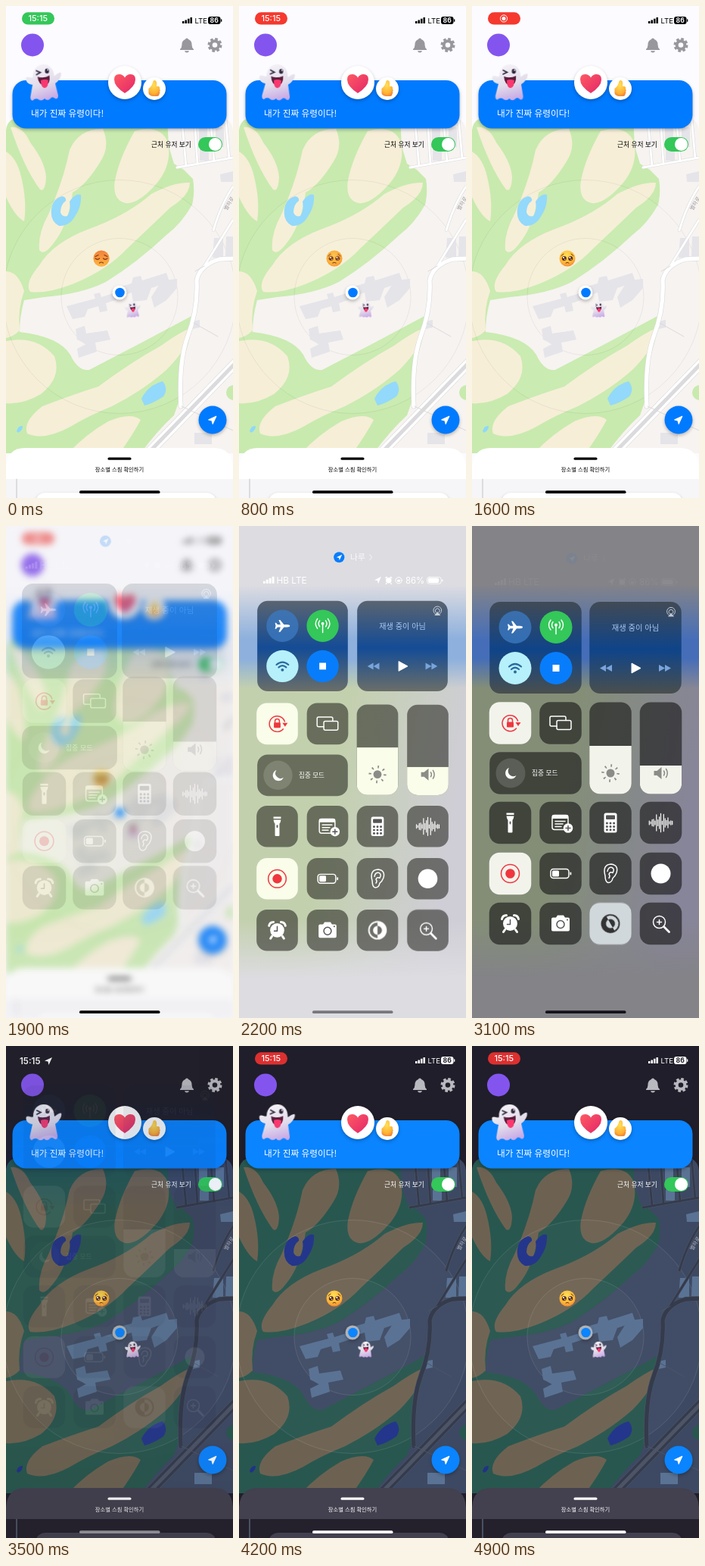
Write an HTML page that moves like this. It is 300x649 px and loops after 5000 ms.

```html
<!DOCTYPE html>
<html lang="ko">
<head>
<meta charset="utf-8">
<title>Map theme switch</title>
<style>
html, body { margin: 0; width: 100%; height: 100%; overflow: hidden; }
body { position: relative; background: var(--page); animation: theme 5s linear infinite; }
svg, .veil { position: absolute; left: 0; top: 0; width: 300px; height: 649px; display: block; }
svg { font-family: "Noto Sans CJK KR", "Noto Sans CJK", Inter, sans-serif; }
.latin { font-family: Inter, sans-serif; }
.mid { text-anchor: middle; }
.line { fill: none; stroke: currentColor; stroke-linecap: round; stroke-linejoin: round; stroke-width: 1.5; }
.anim { animation: 5s linear infinite; }
.soft { filter: drop-shadow(0 2px 2px #0004); }
.accent { fill: var(--accent); }

/* map */
.land { fill: var(--land); } .green { fill: var(--green); } .sand { fill: var(--sand); }
.water { fill: var(--water); } .block { fill: var(--block); }
.edge, .road { fill: none; stroke-linejoin: round; stroke-linecap: round; }
.edge { stroke: var(--edge); } .road { stroke: var(--road); }
.ring { fill: var(--halo); stroke: var(--ring); }
.ink { fill: var(--ink); color: var(--ink); }
.icon { fill: var(--icon); color: var(--icon); }

.sway { animation: sway 1.25s ease-in-out infinite; }
@keyframes sway { 0%, 100% { transform: rotate(-3deg); } 50% { transform: rotate(4deg); } }
.hot { animation-name: hot; }
@keyframes hot { 0%, 14% { opacity: 1; } 17%, 100% { opacity: 0; } }

/* status bar */
.pill { animation-name: pill; }
@keyframes pill {
  0%, 10% { fill: #34c759; opacity: 1; } 13%, 37% { fill: #f5392f; opacity: 1; }
  40%, 76% { fill: #dc3030; opacity: 0; } 79%, 100% { fill: #dc3030; opacity: 1; }
}
.clock { animation-name: clock; }
@keyframes clock { 0%, 25% { opacity: 1; } 27%, 77% { opacity: 0; } 79%, 100% { opacity: 1; } }
.rec { animation-name: rec; }
@keyframes rec { 0%, 25% { opacity: 0; } 27%, 37% { opacity: 1; } 40%, 100% { opacity: 0; } }
.plain { animation-name: plain; }
@keyframes plain { 0%, 66% { opacity: 0; } 69%, 76% { opacity: 1; } 78%, 100% { opacity: 0; } }
.signal { animation-name: signal; }
@keyframes signal { 0%, 37% { opacity: 1; } 40%, 70.5% { opacity: 0; } 74%, 100% { opacity: 1; } }

/* control centre */
.app { animation-name: blur; }
@keyframes blur {
  0%, 37% { filter: blur(0); } 42%, 63% { filter: blur(20px); } 69%, 100% { filter: blur(0); }
}
.veil {
  background:
    linear-gradient(var(--v0) 12%, var(--v1) 23%, var(--v1) 27%, transparent 33%, transparent 80%, var(--v0) 92%),
    linear-gradient(100deg, var(--v2) 45%, var(--v3) 85%);
  animation-name: veil;
}
@keyframes veil {
  0%, 37% { opacity: 0; } 42%, 63% { opacity: 1; } 66% { opacity: .6; } 70% { opacity: .08; } 72%, 100% { opacity: 0; }
}
.cc { color: #fff; fill: #fff; animation-name: cc; }
@keyframes cc {
  0%, 37% { opacity: 0; transform: translateY(-34px); }
  42%, 63% { opacity: 1; transform: none; }
  66.5% { opacity: .6; transform: translateY(-18px); }
  70% { opacity: .07; transform: translateY(-48px); }
  72%, 100% { opacity: 0; transform: translateY(-56px); }
}
.stretch { animation-name: stretch; }
@keyframes stretch { 0%, 37% { --k: -3; } 43%, 44.5% { --k: 1; } 51%, 100% { --k: 0; } }
.head { animation-name: head; }
@keyframes head { 0%, 59% { opacity: 1; } 62%, 100% { opacity: .06; } }
.tile {
  transform-box: fill-box; transform-origin: center;
  transform: translateY(calc(var(--k) * var(--d) * 1px)) scale(calc(1 - .015 * var(--k)));
}
.base { fill: var(--tile); }
.lit { fill: var(--lit); }
.red { fill: #f0363f; color: #f0363f; }
.grey { fill: #8b8c88; color: #8b8c88; }
.press { fill: #dfe6ea; animation-name: press; }
@keyframes press { 0%, 55% { opacity: 0; } 58% { opacity: .36; } 62%, 100% { opacity: .92; } }
.half { animation-name: half; }
@keyframes half {
  0%, 56% { color: #fff; fill: #fff; transform: rotate(0); }
  58% { color: #eee; fill: #eee; transform: rotate(60deg); }
  62% { color: #333; fill: #333; transform: rotate(150deg); }
  64%, 100% { color: #222; fill: #222; transform: rotate(180deg); }
}
.home { animation-name: home; }
@keyframes home {
  0%, 38% { fill: #000; } 41%, 46% { fill: #77777c; } 50%, 58% { fill: #000; }
  64% { fill: #1e1c28; } 70% { fill: #8c8b92; } 73%, 100% { fill: #fff; }
}
</style>
</head>
<body>
<svg class="app anim" viewBox="0 0 300 649">
  <defs>
    <clipPath id="view"><path d="M0 590V164Q2 147 20 147H280Q298 147 300 164V590Z"/></clipPath>
    <linearGradient id="body" x1=".35" x2=".65" y2="1">
      <stop offset="0" stop-color="#f4f2f7"/><stop offset=".55" stop-color="#e2dcea"/><stop offset="1" stop-color="#c6a6e6"/>
    </linearGradient>
    <radialGradient id="yellow" cx=".45" cy=".3" r=".75">
      <stop offset="0" stop-color="#ffdf58"/><stop offset=".7" stop-color="#ffb233"/><stop offset="1" stop-color="#ee7d35"/>
    </radialGradient>
    <linearGradient id="warm" x2="0" y2="1"><stop stop-color="#f2803f"/><stop offset="1" stop-color="#ffb83c"/></linearGradient>
    <linearGradient id="love" x2="1" y2="1"><stop stop-color="#ff5a62"/><stop offset="1" stop-color="#e2266a"/></linearGradient>
    <g id="ghost">
      <path fill="url(#body)" d="M-14-8C-14-20-6-24 0-24C8-24 14-18 14-8C16-8 20-13 23-12C25-8 19 0 15 2L18 18Q18 23 14 22Q10 18 7 22Q3 25 0 21Q-4 25-8 22Q-12 19-16 23Q-20 22-18 15L-15 2C-20 2-25-3-23-8C-20-10-16-6-14-8Z"/>
      <path d="M-9-16L-4-13.500L-9-11" fill="none" stroke="#33283f" stroke-width="1.800" stroke-linecap="round"/>
      <ellipse cx="5" cy="-15" rx="2.700" ry="3.300" fill="#33283f"/><circle cx="6" cy="-16.500" r=".9" fill="#fff"/>
      <path d="M-8-8Q0-5 8-9Q9 3 1 4Q-7 3-8-8Z" fill="#5a1c3c"/>
      <path d="M-4-3Q1-5 6-3L5 4Q3 8 0 7Q-4 6-4-3Z" fill="#f9386f"/>
    </g>
  </defs>

  <rect width="300" height="649" style="fill:var(--page)"/>
  <g clip-path="url(#view)">
    <rect class="land" y="140" width="300" height="460"/>
    <path class="green" d="M0 147H213L215 185L222 208L235 216L247 228Q250 245 246 262Q232 287 212 302Q174 338 132 364Q100 380 50 384L24 388Q18 410 18 430Q70 436 85 460Q95 482 110 480Q180 444 247 408Q246 430 238 455Q228 490 229 520L222 540Q200 560 178 590H0Z"/>
    <g class="sand">
      <path d="M0 192Q14 200 20 225Q28 258 24 284Q12 278 0 252Z"/>
      <path d="M6 160Q22 158 32 180Q52 206 53 226Q52 246 45 242Q24 214 6 160Z"/>
      <path d="M128 162Q138 185 125 205Q106 236 88 246Q82 290 62 314Q50 330 44 322Q42 300 56 275Q76 230 84 190Q96 162 128 162Z"/>
      <path d="M170 165Q205 156 214 180Q220 208 200 233Q175 262 158 260Q140 256 144 230Q150 200 170 165Z"/>
      <path d="M243 233Q222 232 192 248Q160 276 110 294Q62 312 44 342Q24 366 32 377Q55 380 90 366Q134 348 160 320Q190 292 217 266Q243 250 243 233Z"/>
      <path d="M0 350Q16 350 24 376Q15 400 18 428Q10 436 0 438Z"/>
      <path d="M0 442Q40 434 64 462Q74 490 46 512Q22 526 0 524Z"/>
      <path d="M246 424Q230 430 205 448Q165 470 122 502Q90 512 48 528Q22 548 28 564Q50 574 85 555Q110 540 140 528Q180 508 212 480Q242 450 246 424Z"/>
      <path d="M82 590Q105 565 135 548Q165 535 178 546Q168 565 150 590Z"/>
    </g>
    <g class="water">
      <path d="M60 268Q62 254 74 251Q80 252 79 257Q72 262 72 272Q74 279 81 277Q86 270 84 258Q92 246 99 249Q100 264 92 276Q84 291 70 290Q58 284 60 268Z"/>
      <path d="M179 518Q188 500 207 495Q215 505 208 515Q195 524 183 527Z"/>
      <path d="M14 561Q16 553 22 554Q22 560 16 563Z"/>
    </g>
    <circle class="ring" cx="150" cy="383.500" r="154"/>
    <circle class="ring" cx="150" cy="383.500" r="77"/>
    <g class="block">
      <path d="M80 396L118 386L116 380L124 378L126 384L148 377L150 386L132 392L134 402L124 404L122 396L108 400L104 410L88 413Z"/>
      <path d="M145 372L166 366L168 358L178 356L180 362L212 352L216 364L192 372L186 388L168 390L166 378L148 384Z"/>
      <path d="M192 384L206 362L226 360L226 372L212 388L196 398Z"/>
      <path d="M92 426L104 422L106 432L134 428L138 440L118 444L120 456L96 464L94 452L106 446L94 440Z"/>
      <path d="M275 306H287V332H273ZM291 304H300V330H290ZM249 563H272V578H249ZM246 416L256 414V424L247 426ZM255 160H266V178H255ZM277 160H288V186H277ZM256 190L268 188V204H256ZM283 222L300 218V232H284Z"/>
    </g>
    <circle class="green" cx="301" cy="510" r="10"/>
    <g id="streets">
      <path stroke-width="4" d="M226 213L300 200M232 147L238 211M249 147L253 208M270 147L275 205M290 147L295 201M300 238Q284 262 274 296M300 282L262 343"/>
      <path stroke-width="6.500" d="M304 333L282 334Q256 342 252 362Q254 400 240 436Q228 470 231 528"/>
      <path stroke-width="13" d="M312 462L178 600"/>
    </g>
    <path class="edge" d="M312 462L178 600" stroke-width="5"/>
    <path class="edge" d="M248 418L280 436M232 528L300 560M262 343L250 350" stroke-width="1"/>
    <text class="icon" font-size="7" transform="translate(292 270) rotate(-60)">별하로</text>
  </g>

  <g class="soft"><circle cx="150" cy="378" r="9.500" style="fill:var(--dot)"/><circle class="accent" cx="150.500" cy="378" r="6.300"/></g>
  <g transform="translate(126 333)">
    <circle r="10.500" fill="url(#yellow)"/>
    <g fill="#552917"><circle cx="-4.200" cy="0" r="3"/><circle cx="4.200" cy="0" r="3"/></g>
    <g fill="#fff"><circle cx="-5" cy="-1.200" r="1.100"/><circle cx="3.400" cy="-1.200" r="1.100"/><circle cx="-3.300" cy="1.300" r=".7"/><circle cx="5" cy="1.300" r=".7"/></g>
    <path class="line" style="stroke:#6d3318;stroke-width:1" d="M-8-3.500L-5-6M8-3.500L5-6M-2 6Q0 4.500 2 6"/>
    <g class="anim hot">
      <circle r="10.500" fill="url(#warm)"/>
      <path class="line" style="stroke:#84391f;stroke-width:1.200" d="M-8-2.500L-4-4.500M8-2.500L4-4.500M-8 0Q-5 2.500-2.500 0M8 0Q5 2.500 2.500 0M-2.500 6Q0 4 2.500 6"/>
    </g>
  </g>
  <g transform="translate(167.500 400.500) scale(.44)"><g class="sway"><use href="#ghost"/></g></g>
  <g class="soft"><circle class="accent" cx="273" cy="546" r="18.500"/></g>
  <path d="M278 541L267.500 545.800L272 547L273.200 551.500Z" fill="#fff" stroke="#fff" stroke-linejoin="round"/>

  <circle cx="35" cy="51.500" r="15" fill="#8455ee"/>
  <g class="icon">
    <path d="M239 42.500Q241 42.500 241 44Q245.500 45.500 245.500 51Q245.500 55 248 57V58H230V57Q232.500 55 232.500 51Q232.500 45.500 237 44Q237 42.500 239 42.500ZM236 59.300H242Q241.500 61.500 239 61.500T236 59.300Z"/>
    <circle class="line" cx="276" cy="51.500" r="5.300" style="stroke-width:4"/>
    <circle class="line" cx="276" cy="51.500" r="8" style="stroke-width:3;stroke-linecap:butt" stroke-dasharray="3.600 2.683"/>
  </g>

  <g class="soft"><rect class="accent" x="8.500" y="98" width="283" height="63.500" rx="18"/></g>
  <text x="33" y="146" font-size="11.700" font-weight="500" fill="#fff">내가 진짜 유령이다!</text>
  <g transform="translate(50 101)"><g class="sway"><use href="#ghost"/></g></g>
  <g class="soft" fill="#fff"><circle cx="157" cy="101" r="22"/><circle cx="196" cy="109" r="15"/></g>
  <path fill="url(#love)" d="M157 115Q143 106 143 97Q143 90 149.500 90Q154.500 90 157 94.500Q159.500 90 164.500 90Q171 90 171 97Q171 106 157 115Z"/>
  <path fill="url(#yellow)" d="M188.500 109Q193 106 194.500 99Q196 97 198.500 99Q200 102 199 106H202Q204 107.500 203 109.500Q204.500 111 203 113Q204 115 202.500 116Q202.500 119 199.500 119H194Q189 118 188.500 115Z"/>

  <text class="ink" x="192" y="186" font-size="8.700" font-weight="500">근처 유저 보기</text>
  <rect x="254" y="173" width="32" height="19" rx="9.500" fill="#34c759"/>
  <circle cx="276.500" cy="182.500" r="8.500" fill="#fff"/>

  <path d="M0 649V608Q2 583 25 583H275Q298 583 300 608V649Z" style="fill:var(--sheet)"/>
  <rect y="624" width="300" height="25" style="fill:var(--under)"/>
  <rect class="edge" x="14" y="624" width=".5" height="25"/>
  <rect class="soft" x="40" y="642" width="237" height="20" rx="12" style="fill:var(--sheet)"/>
  <rect class="ink" x="134.500" y="595.500" width="31" height="3.300" rx="1.600"/>
  <text class="ink mid" x="150" y="613.700" font-size="7.300" font-weight="500">장소별 스침 확인하기</text>

  <g class="latin">
    <rect class="anim pill" x="21" y="8.300" width="43" height="16.200" rx="8.100"/>
    <text class="anim clock mid" x="42.300" y="20.300" font-size="11" font-weight="500" fill="#fff">15:15</text>
    <g class="anim rec" fill="#fff"><circle cx="42" cy="16.500" r="4.600" fill="none" stroke="#fff"/><circle cx="42" cy="16.500" r="2.500"/></g>
    <g class="anim plain" fill="#fff"><text x="18" y="24" font-size="11.500" font-weight="600">15:15</text><path d="M61 15L51 19.500L55.500 20.500L56.500 25Z"/></g>
    <g class="anim signal">
      <g class="ink">
        <path d="M233 20H235.500V23H233ZM236.500 18.500H239V23H236.500ZM240 16.800H242.500V23H240ZM243.500 15H246V23H243.500Z"/>
        <text x="249.500" y="22.800" font-size="9.600">LTE</text>
        <rect x="267" y="14" width="16.500" height="10" rx="3"/><rect x="284" y="17.300" width="1.300" height="3.500" rx=".6"/>
      </g>
      <text class="mid" x="275.200" y="22.200" font-size="8.600" font-weight="700" style="fill:var(--page)">86</text>
    </g>
  </g>
</svg>

<div class="veil anim"></div>

<svg class="cc anim" viewBox="0 0 300 649">
  <defs><linearGradient id="glow" x2="0" y2="1">
    <stop style="stop-color:var(--g0)"/><stop offset=".52" style="stop-color:var(--g1)"/><stop offset="1" style="stop-color:var(--g2)"/>
  </linearGradient></defs>
  <g class="anim stretch">
    <g class="head anim"><g class="tile" style="--d:-2">
      <circle cx="132" cy="43" r="7.200" fill="#087dfb"/><path d="M136 39.500L128.500 43L131.700 43.700L132.500 47Z"/>
      <text x="147" y="47" font-size="10.900" opacity=".85">나루</text>
      <path class="line" opacity=".4" d="M173 39.500L176 43L173 46.500"/>
      <path d="M30 75H33V78H30ZM34 73H37V78H34ZM38 71H41V78H38ZM42 69H45V78H42Z"/>
      <g class="latin"><text x="48" y="78.300" font-size="12">HB LTE</text><text x="221" y="78" font-size="11.600">86%</text></g>
      <path d="M188.500 69L179.500 73.500L183.500 74.300L184.500 78.500Z"/>
      <circle cx="198.500" cy="74" r="3.800"/><path class="line" d="M194.500 70.500L196 69.500M202.500 70.500L201 69.500M195.500 78L195 78.500M201.500 78L202 78.500"/>
      <circle class="line" cx="212" cy="74" r="4.200" style="stroke-width:1"/><rect x="210" y="73" width="4" height="3" rx=".5"/>
      <rect class="line" x="250" y="69.500" width="19" height="9" rx="3" style="stroke-width:.8"/><rect x="251.300" y="70.800" width="14.500" height="6.400" rx="2"/><rect x="270" y="72.500" width="1.200" height="3" rx=".6"/>
    </g></g>
    <g id="tiles"></g>
  </g>
</svg>

<svg viewBox="0 0 300 649"><rect class="anim home" x="97" y="639.300" width="106.500" height="3.700" rx="1.850"/></svg>

<script>
// name: [light, dark]
const palette = {
  page: ['#fcfbff', '#201e2a'], land: ['#f7f3f0', '#3d4963'], green: ['#c8eaae', '#28574f'],
  sand: ['#f6eed7', '#6d6252'], water: ['#8fd8fb', '#203289'], block: ['#e5e4e9', '#5a7394'],
  road: ['#ffffff', '#343b4d'], edge: ['#dbdadd', '#4d5466'], ring: ['#0000000f', '#ffffff1c'],
  halo: ['#ffffff08', '#ffffff05'], ink: ['#000000', '#ffffff'], icon: ['#98989c', '#b9b9c0'],
  dot: ['#ffffff', '#aeb2b8'], sheet: ['#ffffff', '#43404f'], under: ['#f6f6f9', '#24212d'],
  accent: ['#007aff', '#0a84ff'], tile: ['#1e1e188c', '#141418b3'], lit: ['#f9fde9', '#ebebef'],
  g0: ['#5a6470', '#29313b'], g1: ['#144c96', '#0b3d7d'], g2: ['#6a6e68', '#2b3033'],
  v0: ['#dddce1', '#2b2b30'], v1: ['#8db0dd', '#002e93'], v2: ['#c3d0ae', '#474e42'], v3: ['#cfced6', '#413e5e']
};
const define = (name, syntax, initialValue) =>
  CSS.registerProperty({ name: '--' + name, syntax, inherits: true, initialValue });
define('k', '<number>', '0');
const vars = Object.entries(palette);
for (const [name, [light]] of vars) define(name, '<color>', light);
const side = i => vars.map(([name, tones]) => `--${name}:${tones[i]}`).join(';');
const sheet = document.createElement('style');
sheet.textContent = `@keyframes theme{0%,60%{${side(0)}}64%,100%{${side(1)}}}`;
document.head.append(sheet);

// each street gets a casing below its surface
const streets = document.getElementById('streets');
const lanes = [...streets.children];
streets.innerHTML = ['edge', 'road'].map(cls => lanes.map(p =>
  `<path class="${cls}" d="${p.getAttribute('d')}" stroke-width="${p.getAttribute('stroke-width') - (cls === 'road' ? 1.2 : 0)}"/>`
).join('')).join('');

const line = (d, extra = '') => `<path class="line" d="${d}" ${extra}/>`;
const dot = (r, extra = '') => `<circle r="${r}" ${extra}/>`;
const at = (x, y, s) => `<g transform="translate(${x} ${y})">${s}</g>`;

// x, y: tile centre; the icon is drawn around it
function tile(x, y, w, h, icon, fill = 'base') {
  const box = `x="${-w / 2}" y="${-h / 2}" width="${w}" height="${h}" rx="14"`;
  const paint = fill === 'glow' ? 'fill="url(#glow)"' : `class="${fill}"`;
  return at(x, y, `<g class="tile" style="--d:${((y - 232) * .03).toFixed(2)}"><rect ${box} ${paint}/>${icon}</g>`);
}
function slider(x, id, top, icon) {
  return tile(x, 293, 55.5, 121, `<clipPath id="${id}"><rect x="-27.75" y="-60.5" width="55.5" height="121" rx="14"/></clipPath>
    <rect class="lit" x="-28" y="${top - 293}" width="56" height="100" clip-path="url(#${id})"/>${at(0, 33, `<g class="grey">${icon}</g>`)}`);
}

const plane = '<path d="M10 0Q10-1.600 6-1.700H2L-3-8H-5L-2.500-1.700H-6.500L-8.500-4H-10L-9 0L-10 4H-8.500L-6.500 1.700H-2.500L-5 8H-3L2 1.700H6Q10 1.600 10 0Z"/>';
const antenna = dot(2, 'cy="-3"') + line('M0-2V9M-4-7Q-7-3-4 1M4-7Q7-3 4 1M-7-9.500Q-12-3-7 3.500M7-9.500Q12-3 7 3.500');
const wifi = '<g color="#2b6aa0" fill="#2b6aa0">' + line('M-8-2Q0-9 8-2M-5 1.500Q0-3 5 1.500', 'style="stroke-width:2.200"') + dot(2, 'cy="5"') + '</g>';
const links = [
  [-27, -27, '#3b78c0cc', plane], [27, -27, '#34c759', antenna],
  [-27, 27, '#b6f0fa', wifi], [27, 27, '#087dfb', '<rect x="-4.500" y="-4.500" width="9" height="9"/>']
].map(([x, y, c, icon]) => at(x, y, dot(21.5, `fill="${c}"`) + icon)).join('');

const skip = '<path d="M0 0L8-4.500V4.500ZM-8 0L0-4.500V4.500Z" fill="#79a4dc"/>';
const media = `<text class="mid" y="-23" font-size="10.300" fill="#a9c9f4">재생 중이 아님</text>`
  + at(-39, 27, skip) + at(39, 27, `<g transform="scale(-1 1)">${skip}</g>`)
  + '<path d="M-5 20.500L7 27L-5 33.500Z" stroke="#fff" stroke-linejoin="round"/>'
  + at(47, -47, '<g opacity=".7" color="#fff">' + line('M-3 4A5.500 5.500 0 1 1 3 4M-2 2A3 3 0 1 1 2 2', 'style="stroke-width:1"') + '<path d="M0 1L4 6H-4Z"/></g>');

const lock = '<g class="red">' + line('M10-3A10.500 10.500 0 1 0 8 7M-3-1V-3.500A3 3 0 0 1 3-3.500V-1')
  + '<path d="M7-1H14L10.500 4Z"/><rect x="-4.500" y="-1.500" width="9" height="7" rx="1.300"/></g>';
const mirror = line('M-5 4H-12Q-14 4-14 2V-7Q-14-9-12-9H5Q7-9 7-7V-4') + '<rect class="line" x="-5" y="-3.500" width="19" height="12" rx="2"/>';
const moon = at(-33, 0, dot(19.5, 'fill="#fff" opacity=".14"') + '<path d="M-2-7A7.500 7.500 0 1 0 7.500 3A7 7 0 0 1-2-7Z"/>')
  + '<text x="-5" y="3.300" font-size="8.700" font-weight="500">집중 모드</text>';
const sun = dot(5.5) + dot(10, 'class="line" style="stroke-width:3.500;stroke-linecap:butt" stroke-dasharray="1.700 6.154"');
const sound = '<path d="M-9-3H-5L1-8V8L-5 3H-9Z"/>' + line('M4-3Q6 0 4 3M7-5.500Q10.500 0 7 5.500');
const torch = '<path d="M-5-13H5V-10.500H-5ZM-5-9H5Q4.500-5 3-3.500V12Q3 13 2 13H-2Q-3 13-3 12V-3.500Q-4.500-5-5-9Z"/><rect x="-.9" y="-2" width="1.800" height="4" rx=".9" fill="#555"/>';
const note = '<rect class="line" x="-11" y="-10" width="21" height="19" rx="3"/><path d="M-11-10H10V-5.500H-11Z"/>' + line('M-7-2H6M-7 1.500H3M-7 5H1')
  + at(10, 7, dot(6.3) + line('M-3 0H3M0-3V3', 'style="color:#555"'));
const keys = [0, 1, 2].flatMap(r => [0, 1, 2].map(c => `<circle cx="${c * 4.6 - 4.6}" cy="${r * 4.4 + .5}" r="1.500"/>`)).join('');
const calc = `<rect x="-8.500" y="-13" width="17" height="26" rx="2.500"/><g fill="#555"><rect x="-6" y="-10" width="12" height="5.500" rx="1"/>${keys}</g>`;
let bars = '';
for (let i = -8; i <= 8; i++) {
  const h = 1 + 13 * Math.exp(-i * i / 30) * (.55 + .45 * Math.cos(i * 2.4 + .8));
  bars += `M${i * 1.9} ${-h}V${h}`;
}
const wave = line(bars, 'style="stroke-width:1.200"');
const record = '<g class="red">' + dot(12, 'class="line"') + dot(6.3) + '</g>';
const battery = '<rect class="line" x="-13" y="-6" width="24" height="12" rx="3.500"/><rect x="-11" y="-4" width="9" height="8" rx="1.500"/><rect x="12.500" y="-2" width="1.800" height="4" rx=".9"/>';
const ear = line('M-7 3Q-11-12 1-12.500Q11-11 8-1Q6 4 3 6Q2 12-3 12Q-7 11-7 3M-4-3Q-3-9 2-8Q6-6 3-1Q-1-3-2 1Q0 3-2 6');
const alarm = dot(9.5) + line('M-11-6Q-10-11-5-11M11-6Q10-11 5-11M-7 8L-9 11M7 8L9 11', 'style="stroke-width:3"') + line('M0-5V1H-4', 'style="color:#555"');
const camera = '<path d="M-12-6Q-12-8-10-8H-6L-4-11H4L6-8H10Q12-8 12-6V8Q12 10 10 10H-10Q-12 10-12 8Z"/>'
  + dot(5, 'cy="1" fill="none" stroke="#555" stroke-width="1.500"') + dot(1, 'cx="9" cy="-5" fill="#555"');
const dark = '<rect class="anim press" x="-27.750" y="-27.750" width="55.500" height="55.500" rx="14"/><g class="anim half">'
  + dot(11.5, 'class="line" style="stroke-width:2"') + '<path d="M0-11.500A11.500 11.500 0 0 1 0 11.500V6A6 6 0 0 0 0-6ZM0-6A6 6 0 0 0 0 6Z"/></g>';
const zoom = '<circle class="line" cx="-2" cy="-2" r="8"/>' + line('M4 4L11 11', 'style="stroke-width:2.800"') + line('M-5-2H1M-2-5V1');

const cols = [50.5, 117, 183, 249.5];
const rows = [
  [391.5, torch, note, calc, wave],
  [458.5, record, battery, ear, dot(13)],
  [524.5, alarm, camera, dark, zoom]
];
document.getElementById('tiles').innerHTML =
  tile(84, 160.5, 121.5, 121, links, 'glow') + tile(216, 160.5, 121.5, 121, media, 'glow')
  + tile(cols[0], 260, 55.5, 55.5, lock, 'lit') + tile(cols[1], 260, 55.5, 55.5, mirror)
  + tile(84, 326, 121.5, 55.5, moon)
  + slider(183, 'cutA', 290, sun) + slider(249.5, 'cutB', 316, sound)
  + rows.map(([y, ...icons]) => icons.map((icon, i) =>
      tile(cols[i], y, 55.5, 55.5, icon, icon === record ? 'lit' : 'base')).join('')).join('');
</script>
</body>
</html>
```
